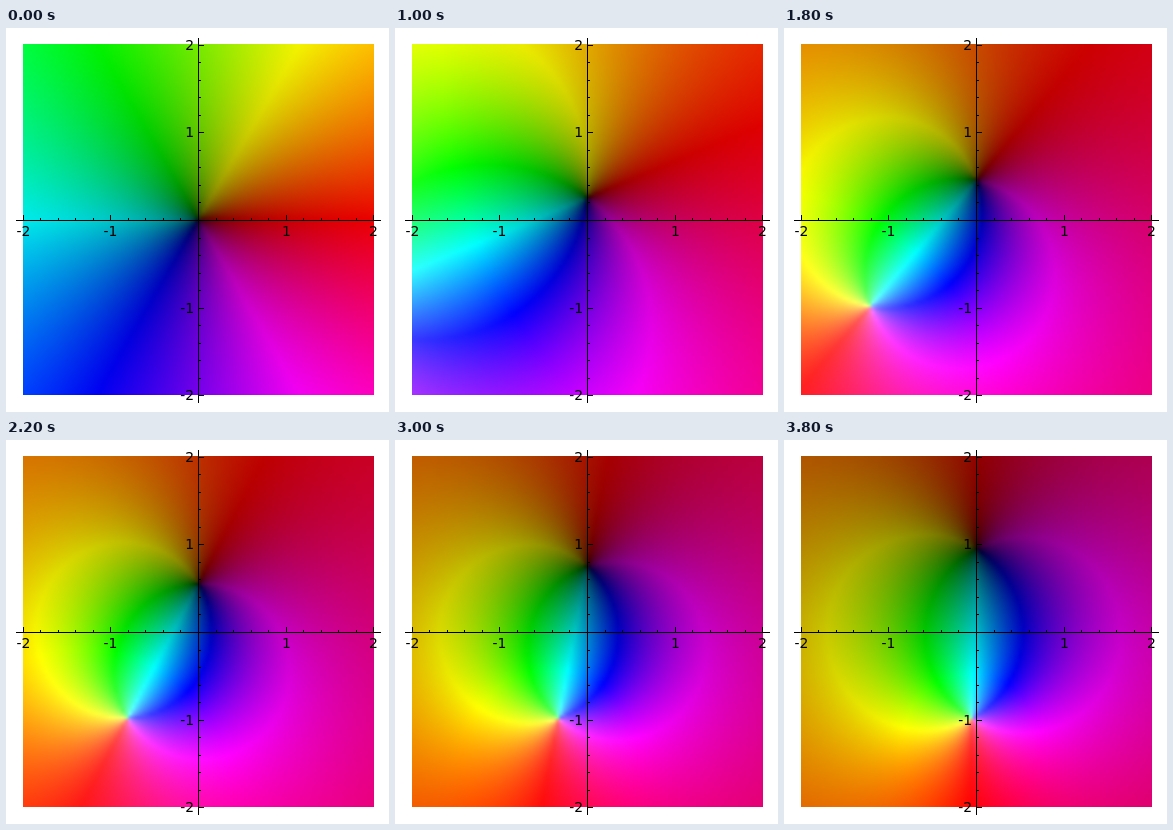
Recreate the animation shown at these times as an HTML page with a canvas. Size 383 by 384 pixels, loop 4000 ms.

```html
<!DOCTYPE html>
<html>
<head>
<meta charset="utf-8">
<style>
html, body { margin: 0; width: 100%; height: 100%; overflow: hidden; background: #fff; }
canvas { display: block; }
</style>
</head>
<body>
<canvas id="stage" width="383" height="384"></canvas>
<script>
const ctx = document.getElementById('stage').getContext('2d');
const N = 100, STEPS = 20, STEP_MS = 200;
const grid = document.createElement('canvas');
grid.width = grid.height = N;
const gridCtx = grid.getContext('2d');
const pixels = gridCtx.createImageData(N, N);

// Hue from the argument, lightness from the magnitude.
function color(re, im) {
  const light = Math.atan(Math.log(Math.sqrt(Math.hypot(re, im)) + 1)) * 4 / Math.PI - 1;
  const low = Math.max(0, light), high = Math.min(1, 1 + light);
  const hue = (Math.atan2(im, re) * 3 / Math.PI + 6) % 6;
  return [0, 4, 2].map(shift => {
    const ramp = Math.abs((hue + shift) % 6 - 3) - 1;
    return 255 * (low + (high - low) * Math.min(1, Math.max(0, ramp)));
  });
}

// w = (z - ti) / (tz + 1 - t + ti), from the identity to the Cayley map.
function plot(t) {
  for (let row = 0, p = 0; row < N; row++) {
    for (let col = 0; col < N; col++, p += 4) {
      const x = -2 + 4 * col / (N - 1), y = 2 - 4 * row / (N - 1);
      const a = x, b = y - t;
      const c = t * x + 1 - t, d = t * y + t;
      const q = c * c + d * d || 1e-12;
      pixels.data.set([...color((a * c + b * d) / q, (b * c - a * d) / q), 255], p);
    }
  }
  gridCtx.putImageData(pixels, 0, 0);
  ctx.drawImage(grid, 17, 16, 351, 351);
}

function axes() {
  const at = v => Math.round(192 + 87.6 * v);
  ctx.fillStyle = '#000';
  ctx.fillRect(10, 192, 365, 1);
  ctx.fillRect(192, 10, 1, 365);
  for (let k = -10; k <= 10; k++) {
    const len = k % 5 ? 2 : 5, pos = at(k / 5);
    ctx.fillRect(pos, 192 - len, 1, len);
    ctx.fillRect(193, pos, len, 1);
  }
  ctx.font = '13.9px "DejaVu Sans", sans-serif';
  for (const v of [-2, -1, 1, 2]) {
    ctx.textAlign = 'center';
    ctx.fillText(v, at(v) + 0.5, 208);
    ctx.textAlign = 'right';
    ctx.fillText(v, 188, at(-v) + 5);
  }
}

let shown = -1;
function frame() {
  const step = Math.floor(performance.now() / STEP_MS) % STEPS;
  if (step !== shown) {
    shown = step;
    ctx.fillStyle = '#fff';
    ctx.fillRect(0, 0, 383, 384);
    ctx.imageSmoothingQuality = 'high';
    plot(step / STEPS);
    axes();
  }
  requestAnimationFrame(frame);
}
frame();
</script>
</body>
</html>
```
